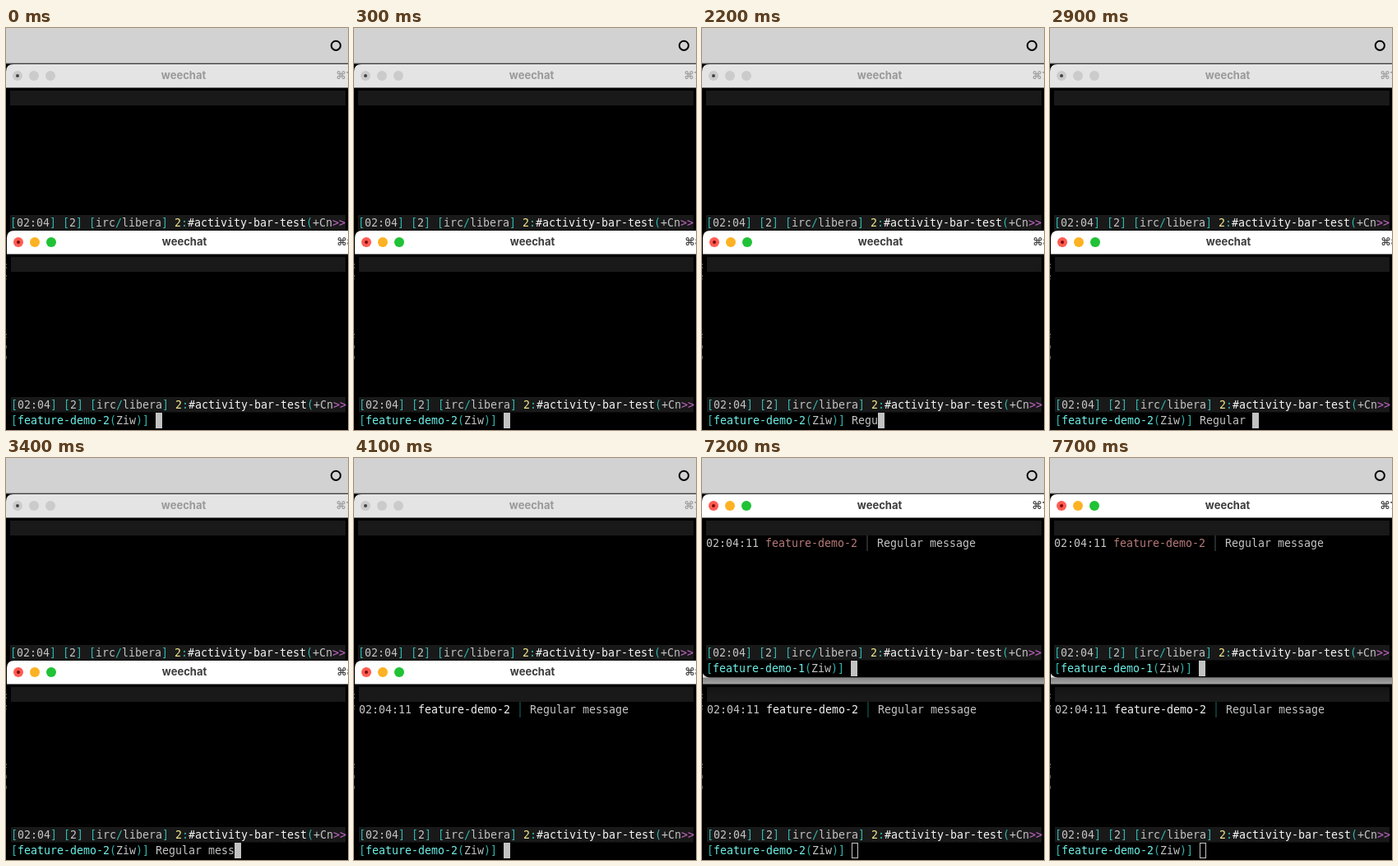
An HTML page that plays this animation: 416 px wide and 488 px high, repeating every 8000 ms.

```html
<!DOCTYPE html>
<html lang="en">
<head>
<meta charset="utf-8">
<title>weechat</title>
<style>
  html, body { margin: 0; width: 100%; height: 100%; overflow: hidden; background: #000; }
  svg { display: block; width: 416px; height: 488px; }
  text { white-space: pre; }
  .mono { font: 13.29px "DejaVu Sans Mono", monospace; }
  .title { font: 700 13px Inter, sans-serif; fill: #999; }
  .key { font: 700 13px "DejaVu Sans", sans-serif; fill: #999; }
  .bar { fill: #e4e4e4; }
  .light { fill: #cbcbcb; }
  .cursor { fill: none; stroke: #c4c4c4; }
  .active .bar { fill: #fff; }
  .active .title, .active .key { fill: #3c3c3c; }
  .active .red { fill: #ff5b52; }
  .active .yellow { fill: #fdb224; }
  .active .green { fill: #20c236; }
  .active .dot { fill: #7d0b08; }
  .active .cursor { fill: #c2c2c2; }
  .shade { visibility: hidden; }
  .active .shade { visibility: visible; }
</style>
</head>
<body>
<svg id="stage" viewBox="0 0 416 488">
  <defs>
    <linearGradient id="fade" x1="0" y1="0" x2="0" y2="1">
      <stop offset="0" stop-color="#000" stop-opacity=".42"/>
      <stop offset="1" stop-color="#000" stop-opacity="0"/>
    </linearGradient>
  </defs>
  <rect width="416" height="488"/>
  <rect width="416" height="43" fill="#d2d2d2"/>
  <rect y="42.5" width="416" height="1" fill="#777"/>
  <circle id="badge" cx="401.3" cy="21.3" r="5.6" stroke-width="2"/>
  <path d="M.5 286v2m0 2v2m0 8v2m0 2v1m0 66v2m0 2v1m0 9v4m0 9v4" stroke="#555"/>
</svg>
<script>
const CELL = 8, ROW = 19, LOOP = 8000;
const GREY = '#c3c3c3', TEAL = '#2fb5ad', WHITE = '#f4f4f4', CYAN = '#6cf0e6',
      YELLOW = '#f3ea8c', PINK = '#c466c8', ROSE = '#b57a78';
const MESSAGE = 'Regular message';
const PROMPT_COLS = 22;
const SENT = 4100, RECEIVED = 4200, SWITCH = 7200;
const KEY_TIMES = [1600, 1800, 2100, 2200, 2400, 2500, 2700, 2900,
                   3000, 3100, 3300, 3400, 3500, 3600, 3800];

const stage = document.getElementById('stage');
const badge = document.getElementById('badge');

// Lays coloured runs on the terminal's character grid.
function line(x, y, runs, cls = '') {
  let col = 0;
  const spans = runs.map(([text, color]) => {
    const span = `<tspan x="${x + col * CELL}" fill="${color}">${text.replace(/>/g, '&gt;')}</tspan>`;
    col += text.length;
    return span;
  });
  return `<text class="mono ${cls}" y="${y}">${spans.join('')}</text>`;
}

function makeWindow({ x, y, left, status, height, nick, senderColor, ruleColor, key }) {
  const g = document.createElementNS('http://www.w3.org/2000/svg', 'g');
  const input = status + ROW;
  const light = (i, name) =>
    `<circle class="light ${name}" cx="${left + 14 + i * 20}" cy="${y + 14}" r="6"/>`;
  const statusRuns = [
    ['[', TEAL], ['02:04', GREY], ['] [', TEAL], ['2', GREY], ['] [', TEAL],
    ['irc', GREY], ['/', TEAL], ['libera', GREY], ['] ', TEAL], ['2', YELLOW],
    [':', TEAL], ['#activity-bar-test', WHITE], ['(', TEAL], ['+Cn', GREY], ['>>', PINK]
  ];
  const promptRuns = [['[', TEAL], [nick, CYAN], ['(', TEAL], ['Ziw', GREY], [')]', TEAL]];
  const ruleX = x + 24.5 * CELL;
  g.innerHTML = `
    <rect class="shade" x="${left}" y="${y + height}" width="430" height="24" fill="url(#fade)"/>
    <rect x="${left}" y="${y}" width="440" height="${height}" rx="9"/>
    <path class="bar" d="M${left} ${y + 28.5}v-19.5q0-9 9-9h430v28.5z"/>
    ${light(0, 'red')}${light(1, 'yellow')}${light(2, 'green')}
    <circle class="dot" cx="${left + 14}" cy="${y + 14}" r="2" fill="#444"/>
    <text class="title" x="${left + 216}" y="${y + 18}" text-anchor="middle">weechat</text>
    <text class="key" x="${left + 401.5}" y="${y + 18}">⌘${key}</text>
    <rect x="${x}" y="${y + 32}" width="${413 - x}" height="18" fill="#191919"/>
    <rect x="${x}" y="${status}" width="${413 - x}" height="18.5" fill="#191919"/>
    <g class="message" visibility="hidden">
      ${line(x, y + 64, [['02:04:11 ', GREY], ['feature-demo-2', senderColor]])}
      <path d="M${ruleX} ${y + 50}v19" stroke="${ruleColor}"/>
      ${line(x + 26 * CELL, y + 64, [[MESSAGE, GREY]])}
    </g>
    ${line(x, status + 14, statusRuns)}
    ${line(x, input + 14, promptRuns)}
    ${line(x + PROMPT_COLS * CELL, input + 14, [['', GREY]], 'typed')}
    <rect class="cursor" x="${x + PROMPT_COLS * CELL + .5}" y="${input + .5}" width="7" height="18"/>`;
  stage.append(g);
  return {
    g, x,
    message: g.querySelector('.message'),
    typed: g.querySelector('.typed tspan'),
    cursor: g.querySelector('.cursor')
  };
}

const upper = makeWindow({
  x: 5, y: 44, left: 0, status: 227, height: 222.5,
  nick: 'feature-demo-1', senderColor: ROSE, ruleColor: '#4a5554', key: 7
});
const lower = makeWindow({
  x: 6, y: 246, left: 1, status: 448, height: 260,
  nick: 'feature-demo-2', senderColor: WHITE, ruleColor: '#176b64', key: 8
});

let front = null;
function focus(win) {
  if (front === win) return;
  front = win;
  for (const w of [upper, lower]) w.g.classList.toggle('active', w === win);
  stage.append(win.g);
}

const show = (el, on) => el.setAttribute('visibility', on ? 'visible' : 'hidden');

function draw(t) {
  const typed = t < SENT ? KEY_TIMES.filter(k => k <= t).length : 0;
  lower.typed.textContent = MESSAGE.slice(0, typed);
  lower.cursor.setAttribute('x', lower.x + (PROMPT_COLS + typed) * CELL + .5);
  show(lower.message, t >= SENT);
  show(upper.message, t >= RECEIVED);
  focus(t < SWITCH ? lower : upper);

  const unread = t >= RECEIVED && t < SWITCH;
  badge.setAttribute('fill', unread ? '#e7951d' : 'none');
  badge.setAttribute('stroke', unread ? '#e7951d' : '#000');
}

const start = performance.now();
function tick() {
  draw((performance.now() - start) % LOOP);
  requestAnimationFrame(tick);
}
tick();
</script>
</body>
</html>
```
